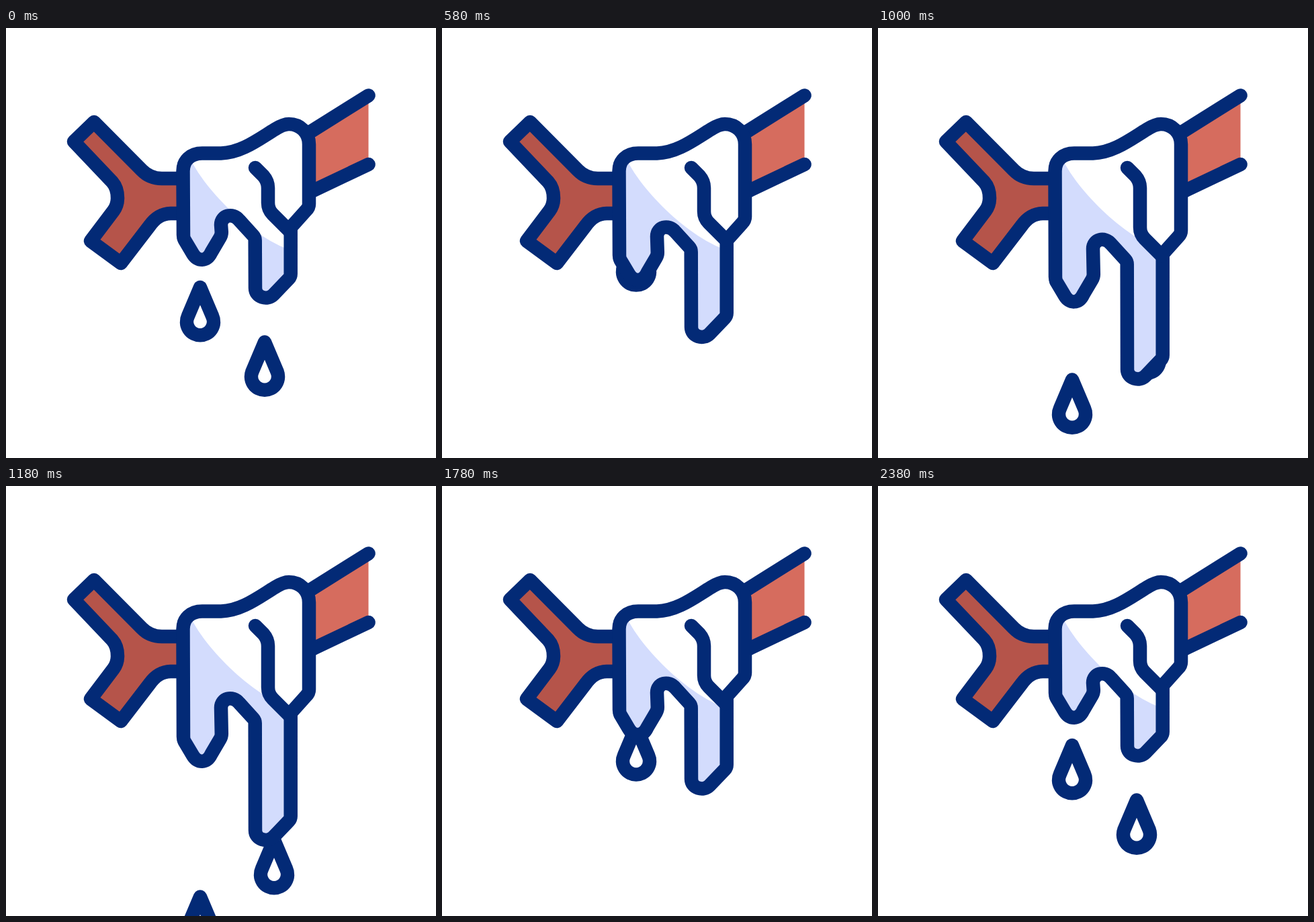
Write an HTML page that moves like this. It is 640 by 640 pixels and loops after 2.4 s.

```html
<!DOCTYPE html>
<html lang="en">
<head>
<meta charset="utf-8">
<title>Dripping branch</title>
<style>
html, body { margin: 0; width: 100%; height: 100%; overflow: hidden; background: #fff; }
svg { display: block; width: 100vw; height: 100vh; }
.line { stroke: #032a76; stroke-width: 20.5; stroke-linecap: round; stroke-linejoin: round; }
</style>
</head>
<body>
<svg viewBox="0 0 640 640">
  <defs>
    <clipPath id="clip"><path id="clipBody"/></clipPath>
    <path id="drop" class="line" fill="#fff" d="M289 386L270.8 429A20 20 0 1 0 307.2 429Z"/>
  </defs>
  <path class="line" fill="#b5544a" d="M263 276H245C231 276.5 222 283 214 294L171 350L126 317L160 272Q166 264 166 253Q166 238 158 229L101 169L131 140L202 211.5Q214 224 232 224H263"/>
  <path fill="#d66c5e" d="M450 156.5L539.5 100V203L450 246Z"/>
  <path class="line" fill="none" d="M450 156.5L539.5 100.5M450 245.5L539.5 203"/>
  <use id="dropA" href="#drop"/>
  <use id="dropB" href="#drop"/>
  <path id="fill" fill="#fff"/>
  <path clip-path="url(#clip)" fill="#d3dcfd" d="M268 184L279 203.5C300 241 355 301.5 414 327L440 337V640H240V184Z"/>
  <path id="outline" class="line" fill="none"/>
  <path id="crack" class="line" fill="none"/>
</svg>
<script>
const LOOP = 2400;
const CRACK_LAG = 80;
const el = id => document.getElementById(id);

function bezier(x1, x2) {
  return x => {
    let lo = 0, hi = 1;
    for (let i = 0; i < 24; i++) {
      const s = (lo + hi) / 2, r = 1 - s;
      if (3 * r * r * s * x1 + 3 * r * s * s * x2 + s * s * s < x) lo = s; else hi = s;
    }
    return lo * lo * (3 - 2 * lo);
  };
}
const rise = bezier(0.55, 0.45);
const fall = bezier(0.52, 0.315);
const speedUp = p => p ** 1.4;
const slowDown = p => 1 - (1 - p) ** 2;
const linear = p => p;

// Each run: start, end, from y, to y, easing, from dx, to dx
const runsA = [
  [0, 505, 0, 266, speedUp],
  [505, 820, -114, 49, linear],
  [820, 1270, 49, 269, linear],
  [1600, 1990, -97, 0, slowDown],
  [1990, LOOP, 0, 0, linear]
];
const runsB = [
  [0, 540, 0, 187.5, speedUp],
  [840, 1460, -100, 190, linear, 14, 14],
  [1780, 2150, -112, 0, slowDown, 14, 0],
  [2150, LOOP, 0, 0, linear]
];

function placeDrop(node, runs, x, y, t) {
  const run = runs.find(r => t >= r[0] && t < r[1]);
  node.style.display = run ? "" : "none";
  if (!run) return;
  const [t0, t1, y0, y1, ease, x0 = 0, x1 = 0] = run;
  const p = ease((t - t0) / (t1 - t0));
  const dx = x0 + (x1 - x0) * p;
  const dy = y0 + (y1 - y0) * p;
  node.setAttribute("transform", `translate(${x + dx} ${y + dy})`);
}

function melt(t) {
  const half = LOOP / 2;
  const s = (t + LOOP) % LOOP;
  return s < half ? rise(s / half) : 1 - fall((s - half) / half);
}

function bodyPath(v) {
  const a = y => y + 65 * v;    // left drip
  const b = y => y + 37 * v;    // gap between drips
  const c = y => y + 125.5 * v; // right drip
  const d = y => y + 41 * v;    // right shoulder
  return `M263.5 213C263.5 197 275 186.5 292 186.5H320C350 185.5 374 167 400 151
    C408 146 414 143 421 143C438 143 451 156 451 173V${d(262)}Q451 ${d(267)} 447 ${d(271)}L423.7 ${d(297)}
    V${c(366)}Q423.7 ${c(370)} 421 ${c(373)}L398 ${c(397)}
    C389 ${c(406)} 371 ${c(401)} 371 ${c(387)}L370.7 ${b(316)}Q370.7 ${b(312)} 368 ${b(309)}
    L347 ${b(286)}C337 ${b(274)} 320 ${b(279)} 320 ${b(293)}
    L320.8 ${a(304)}Q320.8 ${a(308)} 318.5 ${a(312)}L305.5 ${a(334)}
    C299 ${a(348)} 285 ${a(348)} 278 ${a(336)}L265.5 ${a(315)}Q264 ${a(312)} 264 ${a(308)}Z`;
}

function draw(t) {
  const body = bodyPath(melt(t));
  for (const id of ["clipBody", "fill", "outline"]) el(id).setAttribute("d", body);
  const k = 40 * melt(t - CRACK_LAG);
  el("crack").setAttribute("d",
    `M371 208L383 220Q390 228 390 238V${260 + k}Q390 ${270 + k} 397 ${277 + k}L422 ${302 + k}`);
  placeDrop(el("dropA"), runsA, 0, 0, t);
  placeDrop(el("dropB"), runsB, 96, 81.5, t);
}

const start = performance.now();
function tick() {
  draw((performance.now() - start) % LOOP);
  requestAnimationFrame(tick);
}
tick();
</script>
</body>
</html>
```
